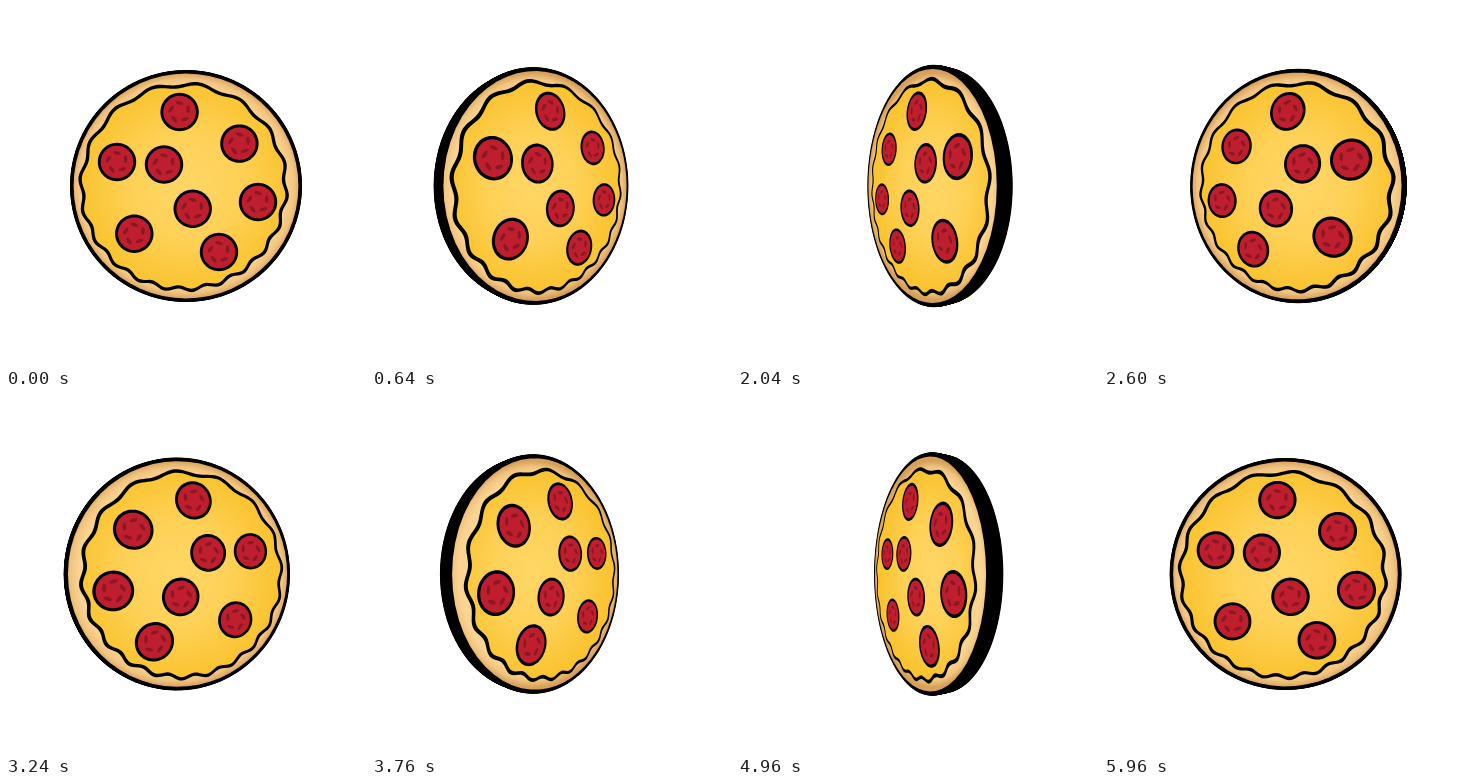
Write an HTML page with a canvas that moves like this. It is 360 by 360 pixels and loops after 6 s.

```html
<!DOCTYPE html>
<html>
<head>
<meta charset="utf-8">
<style>
html, body { margin: 0; width: 100%; height: 100%; overflow: hidden; background: #fff; }
canvas { display: block; }
</style>
</head>
<body>
<canvas id="stage" width="360" height="360"></canvas>
<script>
const ctx = document.getElementById('stage').getContext('2d');
const TAU = Math.PI * 2;
const CAMERA = 306, HALF = 6, RADIUS = 116;
const FACE_SCALE = (CAMERA - HALF) / CAMERA;
const LOOP = 6000, STEP = 40;

// Slice centres, measured from the middle of the pizza
const slices = [[-6.4, -74], [53.4, -42.4], [-69, -24], [-22, -21.5], [72, 16], [6.7, 22.8], [-51.7, 47.7], [33, 66]];

let cos, sin;

function project(x, y, z) {
  const k = CAMERA / (CAMERA + x * sin - z * cos);
  return [180 + (x * cos + z * sin) * k, 180 + y * k];
}

function ring(n, point) {
  return Array.from({ length: n }, (_, i) => point(i / n * TAU));
}

function oval(cx, cy, rx, ry = rx, tilt = 0, n = 60) {
  const c = Math.cos(tilt), s = Math.sin(tilt);
  return ring(n, a => {
    const u = rx * Math.cos(a), v = ry * Math.sin(a);
    return [cx + u * c - v * s, cy + u * s + v * c];
  });
}

// Slightly off-centre circle with uneven scallops
function cheese(grow) {
  return ring(240, a => {
    const r = 102 + 2.5 * Math.cos(a - 2.8) + 1.9 * Math.cos(19 * a + 3 - 5 * Math.cos(a)) + grow;
    return [r * Math.cos(a), r * Math.sin(a)];
  });
}

// Closed outline on the plane at depth z
function trace(points, z) {
  ctx.beginPath();
  for (const [x, y] of points) ctx.lineTo(...project(x * FACE_SCALE, y * FACE_SCALE, z));
  ctx.closePath();
}

function paint(points, z, color) {
  trace(points, z);
  ctx.fillStyle = color;
  ctx.fill();
}

// Radial gradient squeezed along with the face
function paintGlow(points, z, stops) {
  trace(points, z);
  const left = project(-RADIUS, 0, z)[0], right = project(RADIUS, 0, z)[0];
  const g = ctx.createRadialGradient(0, 0, 0, 0, 0, RADIUS);
  stops.forEach(([at, color]) => g.addColorStop(at, color));
  ctx.save();
  ctx.translate((left + right) / 2, 180);
  ctx.scale(Math.max(Math.abs(right - left) / 2 / RADIUS, .01), 1);
  ctx.fillStyle = g;
  ctx.fill();
  ctx.restore();
}

function drawSlice(x, y, z) {
  paint(oval(x, y, 19.2), z, '#000');
  paint(oval(x, y, 16.3), z, '#be1e2d');
  for (const [mx, my] of oval(x, y, 9, 9, -TAU / 4, 5)) {
    const tilt = Math.atan2(my - y, mx - x) + TAU / 4 + .3;
    paint(oval(mx, my, 4, 1.7, tilt, 16), z, '#8a1822');
  }
}

function drawFace(z) {
  paintGlow(oval(0, 0, RADIUS - 3.6), z, [[.84, '#fad592'], [.92, '#f1c47f'], [.98, '#d6a058']]);
  paint(cheese(1.7), z, '#000');
  paintGlow(cheese(-1.7), z, [[0, '#ffd666'], [.45, '#fed157'], [.9, '#fac32f']]);
  for (const [x, y] of slices) drawSlice(x, y, z);
}

// Pointed outline tips seen when the disc is edge-on
function drawTips(z) {
  const x = project(0, 0, z)[0];
  ctx.beginPath();
  for (const side of [-1, 1]) {
    ctx.moveTo(x - 2.5, 180 + side * 118);
    ctx.lineTo(x, 180 + side * 154);
    ctx.lineTo(x + 2.5, 180 + side * 118);
  }
  ctx.fillStyle = '#000';
  ctx.fill();
}

function draw(time) {
  const angle = Math.floor(time % LOOP / STEP) * STEP / LOOP * TAU;
  cos = Math.cos(angle);
  sin = Math.sin(angle);
  ctx.fillStyle = '#fff';
  ctx.fillRect(0, 0, 360, 360);

  const front = cos < 0 ? -HALF : HALF;
  const rim = oval(0, 0, RADIUS, RADIUS, 0, 120);
  for (let i = -12; i <= 12; i++) paint(rim, front * i / 12, '#000');
  if (Math.abs(cos) < .03) drawTips(front);
  else drawFace(front);
}

const start = performance.now();
function tick() {
  draw(performance.now() - start);
  requestAnimationFrame(tick);
}
tick();
</script>
</body>
</html>
```
